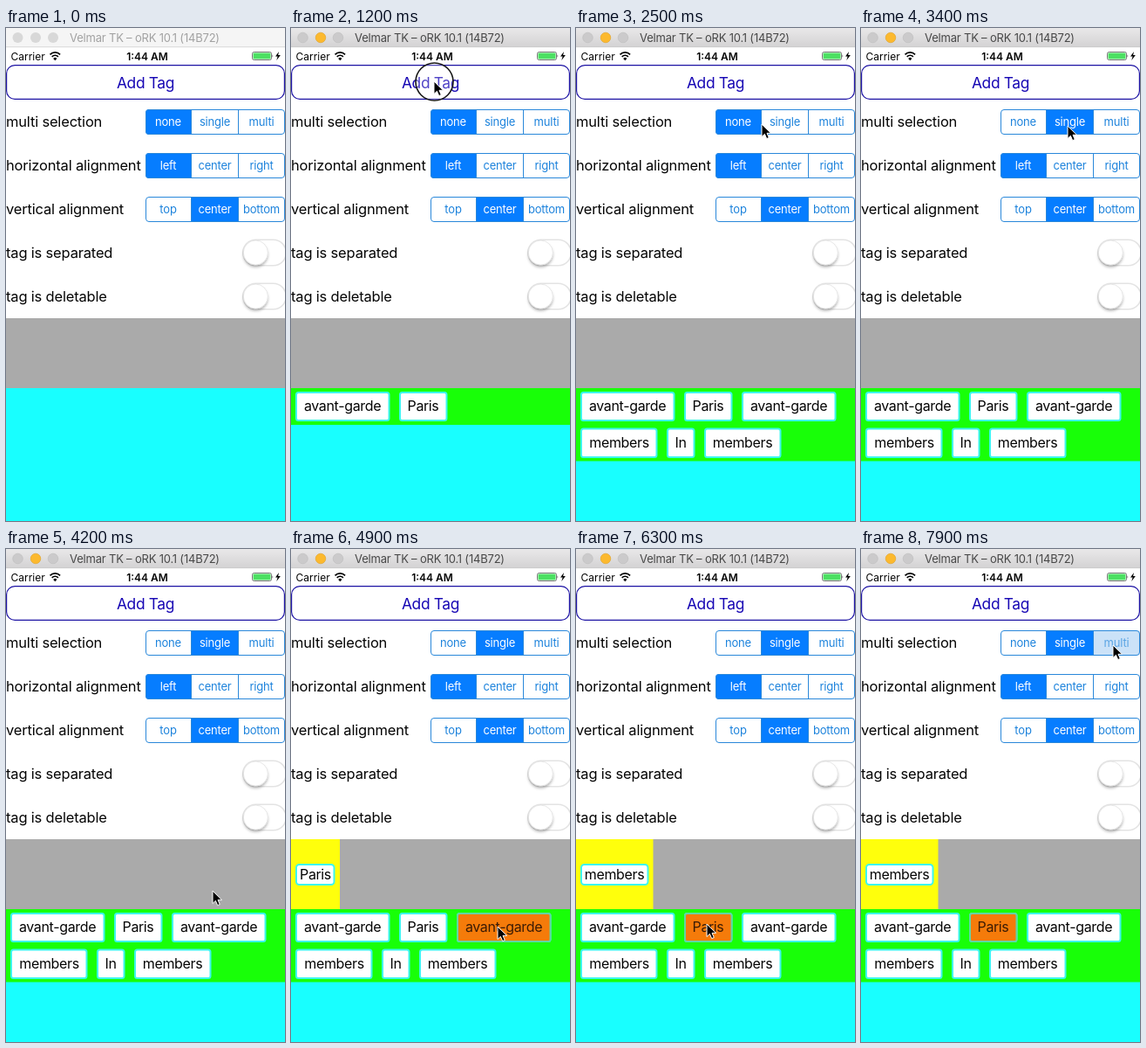
An HTML page that plays this animation: 320 by 564 pixels, repeating every 8 s.

```html
<!DOCTYPE html>
<html lang="en">
<head>
<meta charset="utf-8">
<title>Tag list demo</title>
<style>
html, body { margin: 0; width: 100%; height: 100%; overflow: hidden; background: #fff; }
svg { display: block; width: 320px; height: 564px; }
text { font: 16.5px Inter, "Open Sans", sans-serif; letter-spacing: -.18px; fill: #050505; }
.mid text, text.mid { text-anchor: middle; }
.title text { font-size: 13px; letter-spacing: -.2px; }
.status text { font-size: 12px; letter-spacing: 0; }
.status .clock { font-weight: 600; }
.add { font-size: 17.4px; letter-spacing: -.35px; fill: #1707b4; }
.seg text { font-size: 13px; letter-spacing: -.2px; fill: #1d83dc; }
.seg .sel text { fill: #fff; }
.sel rect, .sel path { fill: #067dff; }
.tag text { font-size: 16px; letter-spacing: -.35px; }
.tag rect { fill: #fff; stroke: #3cf6ee; stroke-width: 2; }
.hot rect { fill: #f57b0a; stroke: #62d5a4; }
.hot text { fill: #3c1c05; }

/* One loop is 8 s, so 1% is 80 ms. */
.t { animation: 8s step-end infinite; }
.active { animation-name: active; }
.tag1 { animation-name: tag1; }
.tag2 { animation-name: tag2; }
.tag3 { animation-name: tag3; }
.tag4 { animation-name: tag4; }
.tag5 { animation-name: tag5; }
.tag6 { animation-name: tag6; }
.none { animation-name: none-sel; }
.single { animation-name: single-sel; }
.press1 { animation-name: press1; }
.press2 { animation-name: press2; }
.pick1 { animation-name: pick1; }
.pick2 { animation-name: pick2; }
.ring { animation-name: ring; }
.arrow { animation-name: arrow; }
@keyframes active { 0% { opacity: 0 } 5% { opacity: 1 } }
@keyframes tag1 { 0% { opacity: 0 } 7.5% { opacity: 1 } }
@keyframes tag2 { 0% { opacity: 0 } 11.25% { opacity: 1 } }
@keyframes tag3 { 0% { opacity: 0 } 16.25% { opacity: 1 } }
@keyframes tag4 { 0% { opacity: 0 } 20% { opacity: 1 } }
@keyframes tag5 { 0% { opacity: 0 } 23.75% { opacity: 1 } }
@keyframes tag6 { 0% { opacity: 0 } 26.25% { opacity: 1 } }
@keyframes none-sel { 0% { opacity: 1 } 37.5% { opacity: 0 } }
@keyframes single-sel { 0% { opacity: 0 } 37.5% { opacity: 1 } }
@keyframes press1 { 0% { opacity: 0 } 35% { opacity: 1 } 37.5% { opacity: 0 } }
@keyframes press2 { 0% { opacity: 0 } 97.5% { opacity: 1 } }
@keyframes pick1 { 0% { opacity: 0 } 58.75% { opacity: 1 } 76.25% { opacity: 0 } }
@keyframes pick2 { 0% { opacity: 0 } 76.25% { opacity: 1 } }
@keyframes ring {
  0%, 7.5%, 11.25%, 16.25%, 20%, 23.75%, 26.25%, 37.5%, 58.75%, 76.25% { opacity: 0 }
  6.25%, 10%, 13.75%, 18.75%, 22.5%, 25%, 36.25%, 57.5%, 75% { opacity: 1 }
}
@keyframes arrow { 0% { opacity: 0 } 1.25% { opacity: 1 } }

.pointer { animation: move 8s ease-in-out infinite; }
@keyframes move {
  0%, 1.25% { transform: translate(190px, 112px) }
  5%, 26.5% { transform: translate(164px, 61px) }
  31.25% { transform: translate(213px, 110px) }
  34.5%, 45% { transform: translate(237px, 112px) }
  55%, 65% { transform: translate(237px, 432px) }
  73.75%, 81.25% { transform: translate(150px, 429px) }
  93.75%, 100% { transform: translate(289px, 110px) }
}
</style>
</head>
<body>
<svg viewBox="0 0 320 564">
  <defs>
    <linearGradient id="bar" x2="0" y2="1">
      <stop stop-color="#e9e8e9"/><stop offset="1" stop-color="#d3d2d3"/>
    </linearGradient>
    <filter id="shade" x="-30%" y="-30%" width="160%" height="180%">
      <feDropShadow dx="0" dy="2.5" stdDeviation="1.8" flood-opacity=".28"/>
    </filter>
    <g id="frame" fill="none" stroke="#2a88da">
      <rect x="160.5" y=".5" width="159" height="28" rx="3.5"/>
      <path d="M212.5 0v29M266.5 0v29"/>
    </g>
    <path id="first" d="M213 0H164a4 4 0 0 0-4 4v21a4 4 0 0 0 4 4h49z"/>
    <rect id="second" x="212" width="55" height="29"/>
    <g id="switch">
      <rect x="271.8" y="-14.7" width="49.5" height="29.5" rx="14.7" fill="#fff" stroke="#e3e3e3" stroke-width="1.5"/>
      <circle cx="286.3" r="14" fill="#fff" stroke="#d9d9d9" stroke-width=".6" filter="url(#shade)"/>
    </g>
  </defs>

  <rect width="320" height="564" fill="#fff"/>

  <g class="title mid">
    <rect width="320" height="22" fill="#f5f5f5"/>
    <g fill="#d8d8d8"><circle cx="13.5" cy="11" r="6"/><circle cx="34" cy="11" r="6"/><circle cx="54" cy="11" r="6"/></g>
    <text x="159" y="16" style="fill:#a2a2a2">Velmar TK – oRK 10.1 (14B72)</text>
    <g class="t active">
      <rect width="320" height="22" fill="url(#bar)"/>
      <g fill="#cbcacb" stroke="#bdbcbd" stroke-width=".6">
        <circle cx="13.5" cy="11" r="5.8"/><circle cx="54" cy="11" r="5.8"/>
        <circle cx="34" cy="11" r="5.8" fill="#fcb92e" stroke="#dfa023"/>
      </g>
      <text x="159" y="16" style="fill:#484848">Velmar TK – oRK 10.1 (14B72)</text>
    </g>
    <path d="M0 21.7h320" stroke="#c4c4c4" stroke-width=".6"/>
  </g>

  <g class="status">
    <text x="5.5" y="36.5">Carrier</text>
    <g fill="none" stroke="#000" stroke-width="1.7">
      <path d="M50.5 30.3a8.3 8.3 0 0 1 11.6 0M52.7 32.8a5.2 5.2 0 0 1 7.2 0"/>
      <path d="M56.3 37.2l-2.1-2.3a3 3 0 0 1 4.2 0z" fill="#000" stroke="none"/>
    </g>
    <text class="clock mid" x="162" y="36.5">1:44 AM</text>
    <rect x="282.5" y="27.5" width="22" height="9" rx="2" fill="#fff" stroke="#555" stroke-width=".8"/>
    <rect x="283.5" y="28.5" width="20" height="7" rx="1" fill="#4ce062"/>
    <path d="M305.5 30.3q1.6 1.7 0 3.4z" fill="#555"/>
    <path d="M313 27l-4 5.6h2.6l-1.3 4.4 4.5-5.9h-2.7z"/>
  </g>

  <rect x=".6" y="42.6" width="318.8" height="38.8" rx="9.5" fill="#fff" stroke="#1c12a4" stroke-width="1.2"/>
  <text class="add mid" x="160" y="69">Add Tag</text>

  <text x="0" y="113">multi selection</text>
  <text x="0" y="163">horizontal alignment</text>
  <text x="0" y="213">vertical alignment</text>
  <text x="0" y="263">tag is separated</text>
  <text x="0" y="313">tag is deletable</text>

  <g class="seg mid" transform="translate(0 93)">
    <text x="186" y="19">none</text><text x="239.5" y="19">single</text><text x="293" y="19">multi</text>
    <g class="t press1"><use href="#second" fill="#cbe2f8"/><text x="239.5" y="19">single</text></g>
    <g class="t press2">
      <path d="M267 0h49a4 4 0 0 1 4 4v21a4 4 0 0 1-4 4h-49z" fill="#cbe2f8"/>
      <text x="293" y="19" style="fill:#5ba5e4">multi</text>
    </g>
    <g class="sel t none"><use href="#first" fill="#067dff"/><text x="186" y="19">none</text></g>
    <g class="sel t single"><use href="#second" fill="#067dff"/><text x="239.5" y="19">single</text></g>
    <use href="#frame"/>
  </g>
  <g class="seg mid" transform="translate(0 143)">
    <text x="239.5" y="19">center</text><text x="293" y="19">right</text>
    <g class="sel"><use href="#first" fill="#067dff"/><text x="186" y="19">left</text></g>
    <use href="#frame"/>
  </g>
  <g class="seg mid" transform="translate(0 193)">
    <text x="186" y="19">top</text><text x="293" y="19">bottom</text>
    <g class="sel"><use href="#second" fill="#067dff"/><text x="239.5" y="19">center</text></g>
    <use href="#frame"/>
  </g>

  <use href="#switch" y="257"/>
  <use href="#switch" y="307"/>

  <rect y="332" width="320" height="80" fill="#aaa"/>
  <rect y="412" width="320" height="152" fill="#18ffff"/>

  <g class="tag mid">
    <g class="t pick1">
      <rect y="332" width="56" height="80" style="fill:#ffff0c;stroke:none"/>
      <rect x="6" y="361" width="43.5" height="23" rx="3.5"/><text x="28" y="378">Paris</text>
    </g>
    <g class="t pick2">
      <rect y="332" width="88.5" height="80" style="fill:#ffff0c;stroke:none"/>
      <rect x="6" y="361" width="76.5" height="23" rx="3.5"/><text x="44" y="378">members</text>
    </g>

    <rect class="t tag1" y="412" width="320" height="42" style="fill:#18ff08;stroke:none"/>
    <rect class="t tag4" y="453" width="320" height="42.5" style="fill:#18ff08;stroke:none"/>
    <g class="t tag1"><rect x="6" y="417" width="106.5" height="32" rx="2.5"/><text x="59" y="438">avant-garde</text></g>
    <g class="t tag2"><rect x="125" y="417" width="53.5" height="32" rx="2.5"/><text x="151.5" y="438">Paris</text></g>
    <g class="t tag3"><rect x="191" y="417" width="106.5" height="32" rx="2.5"/><text x="244" y="438">avant-garde</text></g>
    <g class="t tag4"><rect x="6" y="458.5" width="86.5" height="32.5" rx="2.5"/><text x="49.5" y="480">members</text></g>
    <g class="t tag5"><rect x="105" y="458.5" width="30.5" height="32.5" rx="2.5"/><text x="120" y="480">In</text></g>
    <g class="t tag6"><rect x="148" y="458.5" width="86.5" height="32.5" rx="2.5"/><text x="191" y="480">members</text></g>
    <g class="hot t pick1"><rect x="191" y="417" width="106.5" height="32" rx="2.5"/><text x="244" y="438">avant-garde</text></g>
    <g class="hot t pick2"><rect x="125" y="417" width="53.5" height="32" rx="2.5"/><text x="151.5" y="438">Paris</text></g>
  </g>

  <g class="pointer">
    <circle class="t ring" cx=".5" cy=".5" r="21.5" fill="#fff" fill-opacity=".25" stroke="#161616" stroke-width="1.6"/>
    <path class="t arrow" d="M0 0v14.5l3.4-3.2 2.3 5.3 2.6-1.1-2.3-5.2h4.6z" stroke="#fff" stroke-width="1"/>
  </g>
</svg>
</body>
</html>
```
